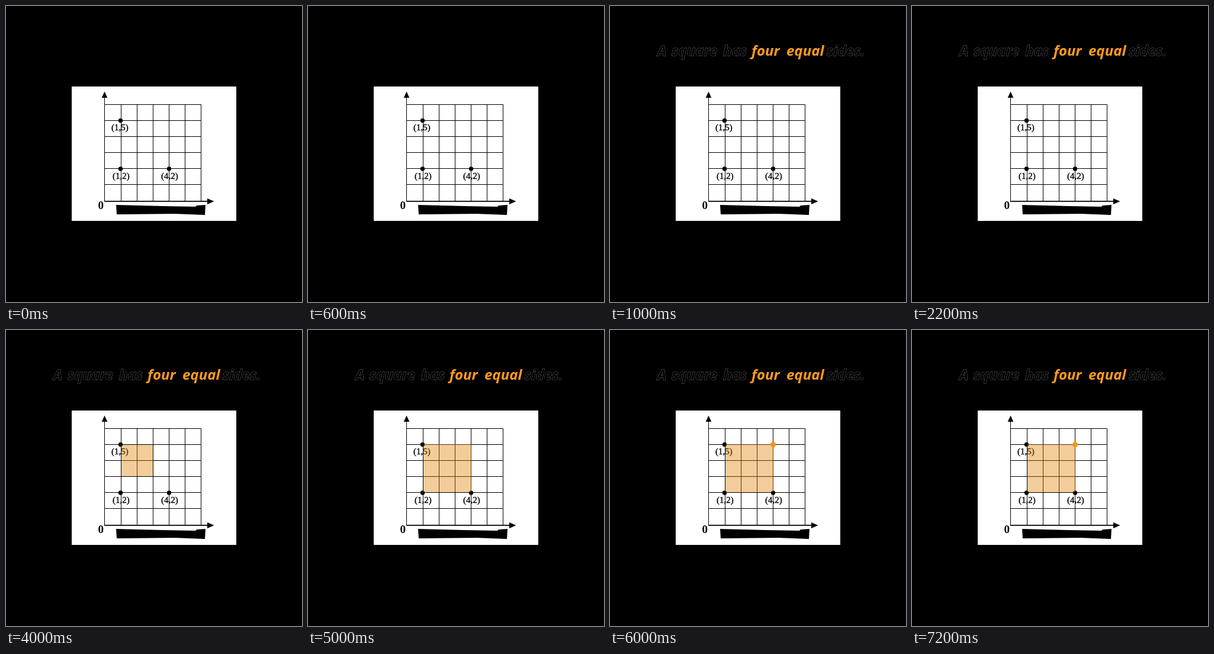
Recreate the animation shown at these times as an HTML page. Size 500x500 px, loop 8 s.

```html
<!DOCTYPE html>
<html lang="en">
<head>
<meta charset="utf-8">
<title>Square on a grid</title>
<style>
html, body { margin: 0; width: 100%; height: 100%; overflow: hidden; background: #000; }
svg { display: block; width: 500px; height: 500px; }
.label { font: 15px "Liberation Serif", serif; stroke: #000; stroke-width: .35px; }
.zero { font: bold 19px "Liberation Serif", serif; }
.title text {
  font: italic 700 24px "Open Sans", sans-serif;
  fill: #000; stroke: #707070; stroke-width: .9px; paint-order: stroke;
}
.title .hot { fill: #ff9c1a; stroke: none; }
</style>
</head>
<body>
<svg viewBox="0 0 500 500">
  <rect x="111" y="136" width="278" height="227" fill="#fff"/>
  <path id="grid" fill="none" stroke="#000" shape-rendering="crispEdges"/>
  <path d="M166 329.8H342" stroke="#000" stroke-width="1.8"/>
  <path d="M166.5 144.5L171.3 155H161.7ZM351.5 330L340 325V335Z"/>
  <path d="M186 336L265 338L320 339L322 337L337 336L336 353L312 352L285 351L187 352Z"/>
  <g id="points"></g>
  <text class="zero" x="155.5" y="343">0</text>
  <rect id="fill" fill="rgb(222,130,5)" fill-opacity=".4" shape-rendering="crispEdges"/>
  <circle id="corner" cx="275.5" cy="193.5" r="4.6" fill="#ff9310"/>
  <g id="title" class="title"></g>
</svg>
<script>
const NS = 'http://www.w3.org/2000/svg';
const LOOP = 8000;
const $ = id => document.getElementById(id);

function add(parent, tag, attrs, text = '') {
  const el = document.createElementNS(NS, tag);
  for (const key in attrs) el.setAttribute(key, attrs[key]);
  el.textContent = text;
  parent.append(el);
}

const xs = [166, 194, 221, 248, 275, 302, 329];
const ys = [166, 193, 220, 247, 274, 301];
$('grid').setAttribute('d',
  xs.map((x, i) => `M${x + .5} ${i ? 166 : 150}V330`).join('') +
  ys.map(y => `M166 ${y + .5}H330`).join(''));

for (const [x, y, name, tx, ty] of [
  [193.5, 193.5, '(1,5)', 178, 210],
  [193.5, 275, '(1,2)', 180, 292],
  [275.5, 275, '(4,2)', 262, 292]
]) {
  add($('points'), 'circle', { cx: x, cy: y, r: 3.7 });
  add($('points'), 'text', { class: 'label', x: tx, y: ty }, name);
}

for (const [x, word, spacing, cls] of [
  [80, 'A', 0, ''],
  [104, 'square', 0, ''],
  [191, 'has', 0, ''],
  [239, 'four', 0, 'hot'],
  [298, 'equal', 0, 'hot'],
  [366, 'sides.', 0, '']
]) add($('title'), 'text', { x, y: 84, class: cls, 'letter-spacing': spacing }, word);

// Fill steps: start time, left, top, right, bottom
const steps = [
  [3000, 195, 194, 221, 220],
  [4000, 195, 194, 248, 247],
  [5000, 195, 193, 276, 274]
];

const show = (el, on) => el.setAttribute('visibility', on ? 'visible' : 'hidden');

function draw(now) {
  const t = now % LOOP;
  const step = steps.filter(s => t >= s[0]).pop();
  show($('title'), t >= 1000);
  show($('fill'), step);
  show($('corner'), t >= 6000);
  if (step) {
    const [, l, top, r, b] = step;
    const box = { x: l, y: top, width: r - l, height: b - top };
    for (const key in box) $('fill').setAttribute(key, box[key]);
  }
}

const start = performance.now();
function tick() {
  draw(performance.now() - start);
  requestAnimationFrame(tick);
}
draw(0);
requestAnimationFrame(tick);
</script>
</body>
</html>
```
